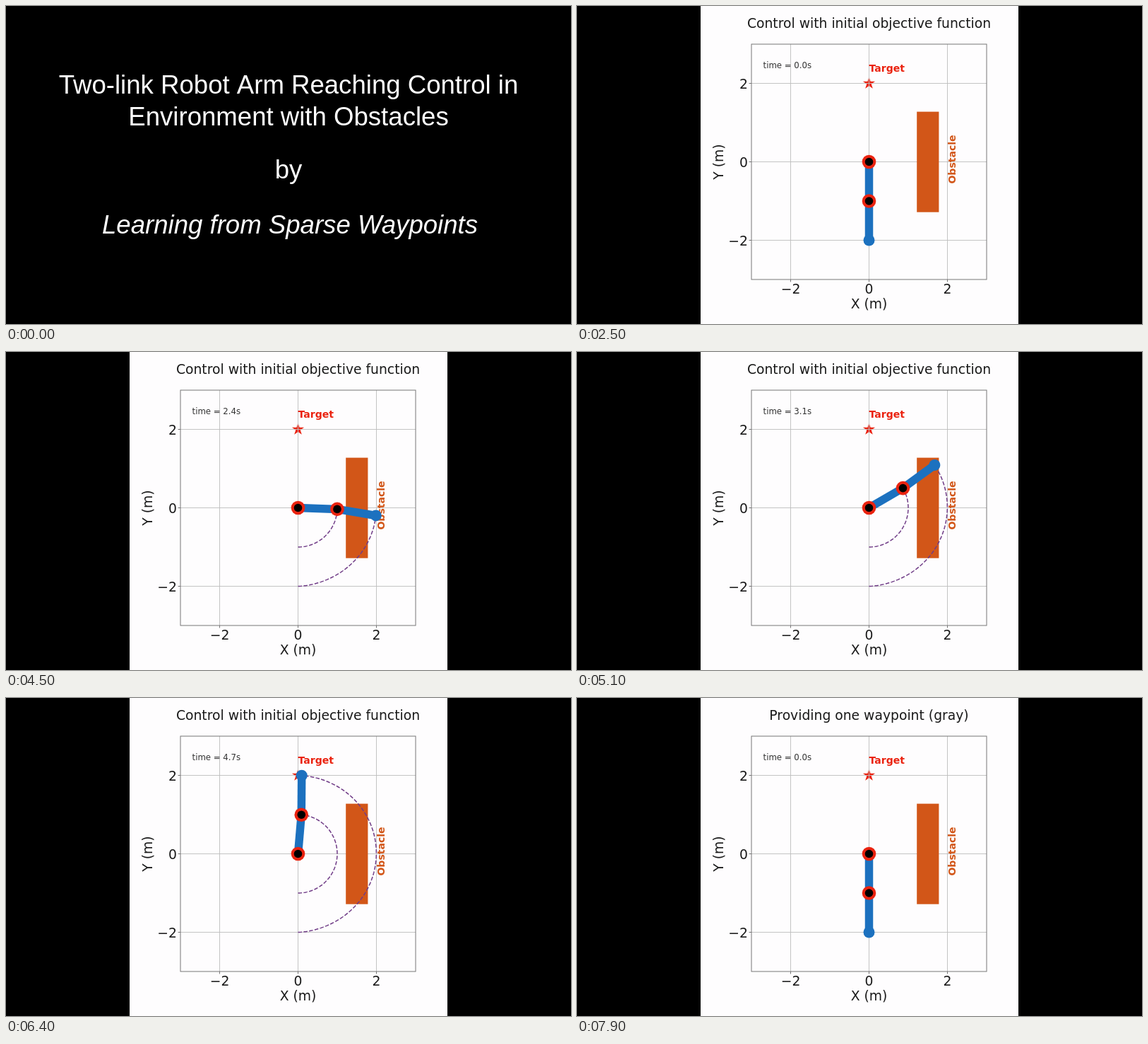
Write an HTML page with a canvas that moves like this. It is 800 px wide and 450 px high and loops after 8 s.

```html
<!DOCTYPE html>
<html lang="en">
<head>
<meta charset="utf-8">
<title>Two-link robot arm</title>
<style>
html, body { margin: 0; width: 100%; height: 100%; overflow: hidden; background: #000; }
canvas { display: block; }
</style>
</head>
<body>
<canvas id="stage" width="800" height="450"></canvas>
<script>
const ctx = document.getElementById('stage').getContext('2d');
const LOOP = 8000, STEP = 100, DURATION = 5;
const SANS = '"DejaVu Sans", sans-serif';
const CARD = '36.6px "Liberation Sans", Arial, sans-serif';
const BLUE = '#1c71bf', RED = '#ea2310', ORANGE = '#d25618', PURPLE = '#703c87';
const px = x => 413.5 + 55.5 * x;
const py = y => 220.5 - 55.5 * y;

function text(str, x, y, font, color = '#1a1a1a', align = 'center', turn = 0) {
  ctx.save();
  ctx.translate(x, y);
  ctx.rotate(turn);
  ctx.font = font;
  ctx.fillStyle = color;
  ctx.textAlign = align;
  ctx.fillText(str, 0, 0);
  ctx.restore();
}

function path(points, color, width, dash = []) {
  ctx.beginPath();
  points.forEach(([x, y]) => ctx.lineTo(x, y));
  ctx.strokeStyle = color;
  ctx.lineWidth = width;
  ctx.setLineDash(dash);
  ctx.stroke();
  ctx.setLineDash([]);
}

function disc([x, y], r, color) {
  ctx.beginPath();
  ctx.arc(x, y, r, 0, 2 * Math.PI);
  ctx.fillStyle = color;
  ctx.fill();
}

// Elbow and tip at simulated time t; the second link lags, then catches up.
function pose(t) {
  const s = t / DURATION;
  const a = Math.PI * s * (0.469 + 1.713 * s - 1.182 * s * s);
  const b = Math.PI * s ** 3 * (9.49 - 13.96 * s + 5.47 * s * s);
  const ex = Math.sin(a), ey = -Math.cos(a);
  return [[px(ex), py(ey)], [px(ex + Math.sin(b)), py(ey - Math.cos(b))]];
}

function star(x, y, r) {
  ctx.beginPath();
  for (let i = 0; i < 10; i++) {
    const q = i % 2 ? r * 0.382 : r, a = i * Math.PI / 5;
    ctx.lineTo(x + q * Math.sin(a), y - q * Math.cos(a));
  }
  ctx.fillStyle = RED;
  ctx.fill();
}

function axes(title) {
  const font = '18.75px ' + SANS;
  ctx.fillStyle = '#fefdfe';
  ctx.fillRect(175, 0, 450, 450);
  star(px(0), py(2), 9);
  for (const v of [-2, 0, 2]) {
    const label = String(v).replace('-', '\u2212');
    path([[px(v), 54], [px(v), 387]], '#bebebe', 0.9);
    path([[247, py(v)], [580, py(v)]], '#bebebe', 0.9);
    path([[px(v), 387], [px(v), 390.5]], '#555', 0.8);
    path([[243.5, py(v)], [247, py(v)]], '#555', 0.8);
    text(label, px(v), 407, font);
    text(label, 242, py(v) + 7, font, '#1a1a1a', 'right');
  }
  ctx.strokeStyle = '#777';
  ctx.lineWidth = 1;
  ctx.strokeRect(247, 54, 333, 333);
  text(title, 413.5, 30.5, font);
  text('X (m)', 413.5, 428, font);
  text('Y (m)', 207, 220.5, font, '#1a1a1a', 'center', -Math.PI / 2);
}

function chart(title, t) {
  axes(title);
  const bold = 'bold 14.06px ' + SANS;
  ctx.fillStyle = ORANGE;
  ctx.fillRect(481.2, 149.6, 31.2, 142.1);
  text('Obstacle', 536, 217, bold, ORANGE, 'center', -Math.PI / 2);
  text('Target', 413.5, 93, bold, RED, 'left');
  text(`time = ${t.toFixed(1)}s`, 263.6, 87.5, '11.72px ' + SANS, '#333', 'left');

  const trail = [];
  for (let i = 0; i <= Math.round(t * 20); i++) trail.push(pose(i / 20));
  for (const k of [0, 1]) path(trail.map(p => p[k]), PURPLE, 1.5, [5.5, 2.4]);

  const base = [px(0), py(0)], [elbow, tip] = pose(t);
  path([base, elbow], BLUE, 11.5);
  path([elbow, tip], BLUE, 11.5);
  disc(tip, 8, BLUE);
  for (const joint of [base, elbow]) {
    disc(joint, 9.8, RED);
    disc(joint, 5.8, '#000');
  }
}

function card(...lines) {
  ctx.fillStyle = '#000';
  ctx.fillRect(0, 0, 800, 450);
  for (const [str, y, x = 400, style = ''] of lines) text(str, x, y, style + CARD, '#fff');
}

function draw(ms) {
  ctx.globalAlpha = 1;
  card();
  if (ms < 500) {
    card(
      ['Two-link Robot Arm Reaching Control in', 124],
      ['Environment with Obstacles', 169],
      ['by', 243.5],
      ['Learning from Sparse Waypoints', 322, 402, 'italic ']
    );
  } else if (ms < 2500) {
    card(
      ['Before learning:', 133],
      ['Robot arm motion with an arbitrary initial', 220],
      ['control objective function', 264]
    );
  } else if (ms < 6600) {
    const n = Math.floor((ms - 2500) / STEP);
    chart('Control with initial objective function', Math.floor(n * 1.225) / 10);
  } else {
    // The card dissolves into the next chart in five steps.
    const n = Math.max(0, Math.floor((ms - 7500) / STEP) + 1);
    if (n) chart('Providing one waypoint (gray)', 0);
    ctx.globalAlpha = 1 - n / 5;
    card(['Provide only one waypoint', 205]);
  }
}

const start = performance.now();
function tick() {
  draw((performance.now() - start) % LOOP);
  requestAnimationFrame(tick);
}
tick();
</script>
</body>
</html>
```
